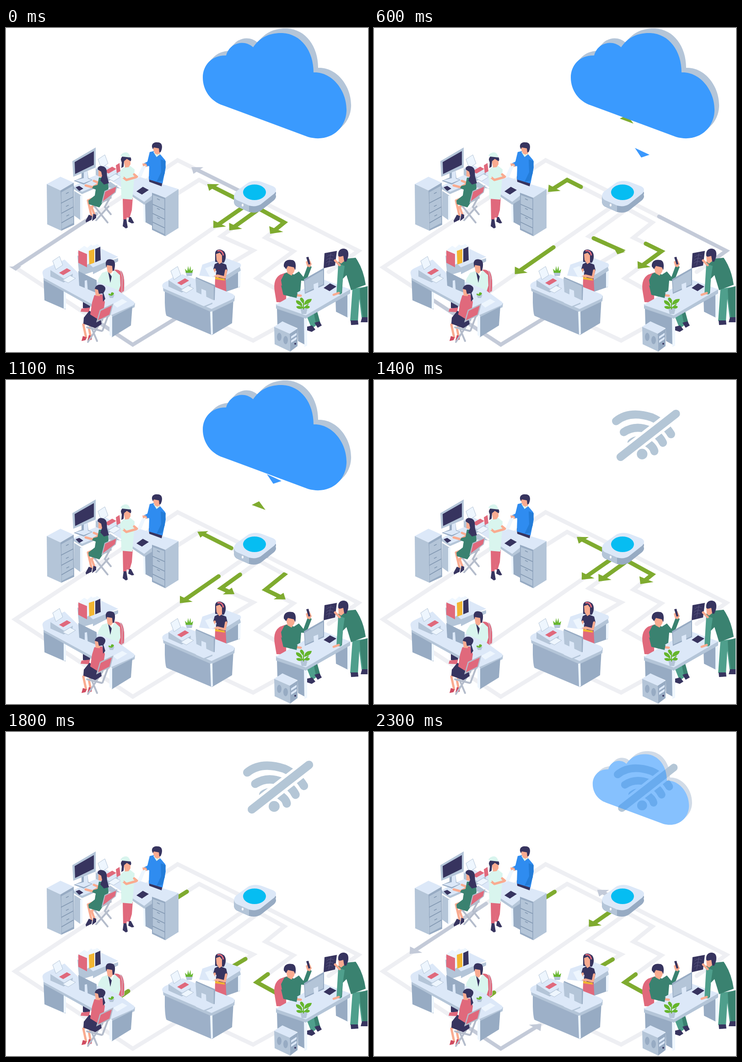
An HTML page that plays this animation: 791 px wide and 708 px high, repeating every 2400 ms.

```html
<!DOCTYPE html>
<html lang="en">
<head>
<meta charset="utf-8">
<title>Office network</title>
<style>
html, body { margin: 0; width: 100%; height: 100%; overflow: hidden; background: #fff; }
svg { display: block; width: 791px; height: 708px; }
.t { fill: #dce8f8 } .l { fill: #b4c5d8 } .d { fill: #97abc3 } .e { fill: #eef6fe }
.n { fill: #37345f } .p { fill: #e0697c } .g { fill: #3a8270 } .h { fill: #4f9f8c }
.s { fill: #f9ab90 } .m { fill: #d9f5ee } .w { fill: #fff } .b { fill: #2f8cf0 }
.y { fill: #f2b632 } .f { fill: #65b52c } .r { fill: #d04a60 }
.line { fill: none; stroke-linejoin: miter; stroke-linecap: round }
.leg { fill: none; stroke: #b4bccb; stroke-width: 4; stroke-linecap: round }
.gap { fill: none; stroke: #8197b1; stroke-width: 1.5 }
.arm { fill: none; stroke: #f9ab90; stroke-width: 5; stroke-linecap: round; stroke-linejoin: round }
</style>
</head>
<body>
<svg viewBox="0 0 791 708">
<defs>
  <path id="puff" d="M474 169C447 160 430 136 430 108C430 81 450 59 481 60C487 34 519 23 540 42C556 18 580 10 604 11C645 13 672 50 672 97C712 95 746 137 744 182C742 222 706 251 660 238Z"/>
  <path id="slab" d="M503 357L529 338Q542 331 558 336L584 346Q595 352 586 362L557 385Q546 392 531 388L504 376Q493 368 503 357Z"/>
  <g id="printer">
    <path class="l" d="M97 529L112 520L146 537L145 546L126 556L97 543Z"/>
    <path class="t" d="M97 529L113 519L146 537L127 548Z"/>
    <path class="e" d="M102 509L117 499L124 518L109 528Z" stroke="#b4c5d8"/>
    <path class="p" d="M116 535L133 525L142 530L125 540Z"/>
    <path class="e" d="M124 551L140 541L152 547L136 557Z" stroke="#b4c5d8"/>
  </g>
</defs>

<g class="line" stroke="#eeeff3" stroke-width="9">
  <path d="M545 373L375 289L20 523L277 692L390 623"/>
  <path d="M545 394L422 332L360 371M545 373L250 578"/>
  <path d="M548 399L470 455L540 486L484 519"/>
  <path d="M555 396L608 425L567 458L628 488L548 547L590 570"/>
  <path d="M570 385L770 487L705 533M470 650L540 683L600 650"/>
</g>
<g id="flow"></g>

<path id="up" fill="#7fab2f" d="M537 273L553 265L567 284Z"/>
<path id="down" fill="#3a98fd" d="M570 262L602 277L584 283Z"/>

<g id="wifi" class="line" stroke="#b4c6d6" stroke-width="20">
  <path d="M522 84Q555 57 610 75Q640 88 657 116M541 111Q570 92 605 107Q628 118 637 137M560 137Q575 125 598 137Q614 147 616 158"/>
  <path d="M533 172L669 66" stroke="#fff" stroke-width="33"/>
  <path d="M533 172L669 66"/>
  <circle cx="586" cy="165" r="13" fill="#b4c6d6" stroke="none"/>
</g>
<g id="cloud">
  <g fill="#b4c5d8"><use href="#puff" x="10" y="-10"/><use href="#puff" x="5" y="-5"/></g>
  <use href="#puff" fill="#3a9afe"/>
</g>

<!-- hub -->
<g class="d"><use href="#slab" y="14"/><use href="#slab" y="7"/></g>
<path class="l" d="M498 367L498 381Q499 386 505 390L531 402L531 388L504 376Z"/>
<use href="#slab" class="t"/>
<ellipse cx="543" cy="359" rx="25" ry="17" fill="#06bdf2"/>
<ellipse class="w" cx="517" cy="387" rx="2" ry="3"/>

<!-- reception -->
<g>
  <path class="l" d="M149 356L165 366L163 420L149 410Z"/>
  <path class="e" d="M162 367L167 365L167 416L162 420Z"/>
  <path class="d" d="M301 382L319 374L319 432L304 424Z"/>
  <path class="e" d="M300 386L304 384L305 424L301 423Z"/>
  <path class="l" d="M148 352L166 363L228 336L302 386L340 362L340 355L148 345Z"/>
  <path class="t" d="M147 346L186 326L228 308L266 317L348 343L302 380L228 332L166 358Z"/>
  <path class="d" d="M165 317L178 311L180 328L189 332L170 342L148 334L165 327Z"/>
  <path class="t" d="M170 315L178 311L179 329L187 332L170 339L151 333L170 328Z"/>
  <path class="l" d="M145 291L196 261L196 305L147 325Z"/>
  <path class="n" d="M150 293L192 269L192 299L151 319Z"/>
  <use href="#printer" x="99" y="-222"/>
  <path class="p" d="M240 300L248 295L250 313L242 317Z"/>
  <path class="n" d="M152 348L160 345L169 351L160 356Z"/>
  <path class="n" d="M285 357L299 347L312 354L297 364Z"/>
  <!-- standing colleague -->
  <path class="n" d="M312 324L343 332L340 346L313 336Z"/>
  <path class="s" d="M321 259L338 262L336 276L332 282L324 278Z"/>
  <path class="b" d="M314 271L323 269L330 281L337 276L348 289L349 305L342 340L312 331L313 303L308 296Z"/>
  <path d="M338 287L349 291L347 317L341 334L329 336L339 315Z" fill="#237cd8"/>
  <path class="m" d="M322 271L329 282L336 276L326 269Z"/>
  <path class="s" d="M322 262H336V273L331 277L325 274Z"/>
  <path class="n" d="M319 260C318 251 326 249 332 250C342 250 343 261 338 271L335 272L334 263L323 261L321 265Z"/>
  <path class="b" d="M315 279L320 286L311 302L302 304L299 297L309 292Z"/>
  <path class="s" d="M298 296L306 296L309 302L300 306Z"/>
  <path class="e" d="M297 303L306 300L296 325L285 329Z"/>
  <!-- nurse -->
  <path class="p" d="M255 371L277 371L275 398L270 415L264 414L268 387L263 420L256 419Z"/>
  <path class="n" d="M257 418L263 418L266 436L262 438L255 433ZM269 413L273 413L280 426L275 427L267 423Z"/>
  <path class="m" d="M256 305L271 301L281 309L280 330L276 375L252 373L251 325L249 314Z"/>
  <path class="s" d="M257 286L272 286L272 298L268 304L260 305Z"/>
  <path class="n" d="M251 288C251 280 259 277 266 279C274 280 275 289 272 291L264 286L258 291L257 303L252 306L253 294Z"/>
  <path class="m" d="M250 279C255 270 267 269 270 278L272 283L254 281Z"/>
  <path class="arm" d="M253 324L263 332L284 326M280 320L286 325"/>
  <path class="m" d="M250 310L258 309L257 328L250 328Z"/>
  <!-- visitor on chair -->
  <path class="arm" stroke-width="7" d="M196 370L179 377L187 411M203 383L187 391L194 410"/>
  <path class="n" d="M181 408L188 411L187 419L175 425L174 421ZM191 406L197 408L197 415L188 422Z"/>
  <path class="leg" d="M193 389L222 425M224 390L197 420M229 371L193 389M239 349L216 391L229 407"/>
  <path class="arm" d="M200 342L189 348L174 344M204 339L192 334"/>
  <path class="g" d="M203 327L222 327L224 350L217 373L204 392L181 385L180 377L194 366L196 353L188 350L191 345L200 343Z"/>
  <path class="s" d="M202 309L211 309L211 326L202 324Z"/>
  <path class="n" d="M200 309C200 301 208 300 214 303C222 307 220 316 221 325L225 339L214 342L206 333L210 323L208 314Z"/>
  <path class="p" d="M216 357L242 345L239 359L210 381Z" stroke="#b4bccb" stroke-width="2"/>
  <!-- filing cabinets -->
  <path class="t" d="M89 341L119 325L148 338L119 355Z"/>
  <path class="l" d="M89 341L119 355L121 443L90 429Z"/>
  <path class="d" d="M119 355L148 338L149 430L121 443Z"/>
  <path class="l" d="M121 359L146 345L147 426L122 439Z"/>
  <path class="gap" d="M120 383L147 369M121 405L147 391M121 426L147 411M131 362L137 359M131 390L137 387M132 411L138 408"/>
  <path class="t" d="M319 360L348 343L377 352L348 371Z"/>
  <path class="d" d="M319 360L348 371L348 455L319 441Z"/>
  <path class="l" d="M348 371L377 352L377 437L348 455ZM321 365L346 374L346 450L321 438Z"/>
  <path class="gap" d="M320 385L347 397M320 405L347 418M320 424L347 437M330 373L336 376M330 394L336 397M330 414L336 417"/>
</g>

<!-- consulting desk -->
<g>
  <path class="d" d="M82 546L130 572L130 615L84 595Z"/>
  <path class="e" d="M126 570L131 570L131 613L126 614Z"/>
  <path class="l" d="M156 497L192 519L192 532L160 542ZM190 520L245 503L245 510L190 538Z"/>
  <path class="t" d="M155 491L193 475L245 500L190 523Z"/>
  <!-- binders -->
  <path class="e" d="M160 484L171 476L184 484L184 513L176 518L158 488ZM178 480L186 473L196 480L196 508L188 512ZM191 477L199 472L208 478L208 505L199 508Z"/>
  <path class="p" d="M158 486L177 494L177 523L158 513Z"/>
  <path class="y" d="M181 487L193 483L193 513L182 517Z"/>
  <path class="n" d="M195 483L206 478L207 507L195 512Z"/>
  <!-- doctor -->
  <path class="p" d="M235 529Q250 524 257 543L258 575L242 587L244 546Z"/>
  <path class="p" d="M250 529Q261 537 258 575L253 578L254 545Z" stroke="#d7dce7"/>
  <path class="m" d="M210 535L222 531L232 540L237 529L249 540L250 563L241 591L199 566L202 548Z"/>
  <path class="n" d="M223 532L231 543L228 557Z"/>
  <path class="s" d="M219 516L235 518L234 530L229 537L222 533Z"/>
  <path class="n" d="M218 516C217 506 225 504 231 506C240 507 239 520 236 530L233 531L232 520L221 518L219 523Z"/>
  <path class="n" d="M168 592L185 598L183 614L168 612Z"/>
  <path class="p" d="M165 613L183 611L182 621L163 620Z"/>
  <path class="l" d="M82 538L231 622L282 601L281 610L231 634L82 551Z"/>
  <path class="t" d="M80 537Q78 530 88 525L128 506L163 540L243 572L276 596Q285 601 278 606L231 627L82 546Z"/>
  <path class="d" d="M231 632L276 609L273 650L231 676Z"/>
  <path class="e" d="M226 620L232 630L232 675L226 671Z"/>
  <use href="#printer"/>
  <path class="d" d="M158 531L198 551L198 579L160 563Z"/>
  <path class="t" d="M172 552L177 551L179 578L191 580L175 588L157 581L172 576Z"/>
  <path class="e" d="M234 603L254 592L265 598L243 611Z"/>
  <path class="l" d="M224 583L237 583L234 590L227 590Z"/>
  <path class="f" d="M230 585Q221 583 225 580L229 582Q229 576 234 578Q239 581 231 585Z"/>
  <!-- patient -->
  <path class="arm" stroke-width="6" d="M181 639L169 648L175 676M191 648L181 655L185 675"/>
  <path class="r" d="M168 673L176 676L174 682L165 684ZM181 671L188 673L187 681L178 683Z"/>
  <path class="leg" d="M177 654L209 662M211 637L179 686M186 653L199 684M231 607L211 661"/>
  <path class="n" d="M182 618L205 629L209 647L195 656L169 646L170 633Z"/>
  <path class="p" d="M193 584L210 582L216 599L212 626L200 636L184 626L188 600Z"/>
  <path class="s" d="M194 570L207 572L205 586L196 585Z"/>
  <path class="n" d="M194 570C196 560 207 559 213 563C220 567 217 574 213 579L217 592L212 598L211 580L203 581L201 572Z"/>
  <path class="p" d="M206 617L233 604L227 627L199 641Z" stroke="#b4bccb" stroke-width="2.5"/>
</g>

<!-- front desk -->
<g>
  <path class="d" d="M479 543L512 525L511 566L479 577Z"/>
  <path class="e" d="M507 529L513 525L512 565L507 567Z"/>
  <path class="t" d="M429 517L476 501L511 514Q516 518 511 524L476 547L422 541Z"/>
  <path class="l" d="M511 522L477 543L477 553L513 530Z"/>
  <!-- clerk -->
  <path class="p" d="M457 546L480 546L482 586L456 580Z"/>
  <path class="n" d="M456 516L466 511L481 517L484 529L479 549L457 548L460 531L453 527Z"/>
  <path class="n" d="M457 493C457 484 466 482 473 486C483 490 481 506 476 513L457 511Z"/>
  <path class="s" d="M459 494L467 491L472 497L472 512L466 516L460 507Z"/>
  <path fill="none" stroke="#e0697c" stroke-width="3" d="M462 487Q472 484 475 497"/>
  <path class="arm" d="M456 528L452 539L463 543M481 530L478 545L462 541"/>
  <path class="y" d="M457 544L478 548L478 552L457 549Z"/>
  <path class="e" d="M435 525L449 520L459 540L446 545Z"/>
  <path d="M347 573L449 615L450 671L351 629Q348 626 347 600Z" fill="#9db0c8"/>
  <path class="d" d="M449 615L497 592L494 645L450 671Z"/>
  <path class="l" d="M342 560L449 607L500 585L499 597L449 621L344 575Z"/>
  <path class="e" d="M446 620L451 619L452 669L448 671Z"/>
  <path class="t" d="M342 566Q339 560 348 555L386 538L495 581Q503 586 496 592L449 614L344 569Z"/>
  <use href="#printer" x="258" y="22"/>
  <path class="l" d="M392 533L408 533L406 542L395 542Z"/>
  <path class="f" d="M393 535L391 526L396 531L398 520L400 530L403 520L404 531L409 527L407 535Z"/>
  <path class="d" d="M415 544L457 562L456 595L417 575Z"/>
  <path class="l" d="M414 546L454 564L454 595L416 577Z"/>
  <path class="t" d="M427 570L437 574L438 596L450 600L432 608L414 600L427 594Z"/>
  <path class="l" d="M414 600L432 608L451 600L451 603L432 611L414 603Z"/>
</g>

<!-- surgeons -->
<g>
  <path class="p" d="M587 575Q583 549 599 539L613 534L612 600L591 599Z"/>
  <path class="g" d="M608 537L617 533L629 539L640 532L650 544L660 517L668 522L656 553L645 552L643 575L646 588L635 592L606 581L601 551Z"/>
  <path class="s" d="M611 519L632 520L630 532L624 541L615 536Z"/>
  <path class="n" d="M607 521C606 508 617 505 625 507C634 508 634 520 632 529L629 523L616 520L612 527Z"/>
  <path class="s" d="M655 511L663 505L668 516L664 523L658 521Z"/>
  <path class="n" d="M656 501L661 500L665 516L661 517ZM696 492L723 487L719 519L694 525Z"/>
  <path fill="none" stroke="#5a5780" d="M710 492L705 519M701 500Q709 493 716 498M699 508Q707 500 715 505M699 514Q707 507 714 512"/>
  <path class="h" d="M658 632L672 620L680 648L668 657Z"/>
  <path class="g" d="M672 620L679 616L687 645L678 650Z"/>
  <path class="n" d="M656 653L669 650L676 659L668 664L656 660ZM674 644L685 641L690 650L681 655Z"/>
  <path class="d" d="M592 611L652 632L653 692L638 684L637 656L607 643L593 648Z"/>
  <path class="e" d="M651 630L658 627L658 694L652 697Z"/>
  <path class="d" d="M720 592L748 577L747 633L721 620Z"/>
  <path class="e" d="M746 578L752 574L752 630L746 633Z"/>
  <path class="l" d="M590 603L655 626L752 571L752 580L655 635L590 613Z"/>
  <path class="t" d="M589 605L689 548L752 571L655 628Z"/>
  <path class="arm" d="M611 581L644 585"/>
  <path class="g" d="M601 562L614 572L637 579L635 590L606 583Z"/>
  <path class="d" d="M651 549L695 524L695 562L653 581Z"/>
  <path class="l" d="M653 552L693 529L693 560L654 578Z"/>
  <path class="t" d="M672 560L682 556L683 583L695 586L678 598L663 592L674 586Z"/>
  <path class="n" d="M694 568L708 558L722 565L707 575Z"/>
  <path class="l" d="M643 612L659 612L656 625L646 625Z"/>
  <path fill="none" stroke="#65b52c" stroke-width="2" d="M650 615V594M650 612L640 602M651 612L661 603"/>
  <path class="f" d="M650 603Q637 590 646 589Q654 593 650 603ZM648 607Q632 604 634 595Q645 595 648 607ZM651 605Q653 591 668 592Q667 602 651 605ZM649 612Q638 617 634 609Q642 605 649 612ZM651 611Q658 603 664 609Q662 616 651 611Z"/>
  <!-- standing surgeon -->
  <path class="h" d="M757 570L789 565L789 632L777 633L772 592L769 641L752 640Z"/>
  <path class="g" d="M773 570L790 564L790 632L780 634L774 590Z"/>
  <path class="n" d="M753 639L769 639L770 648L754 649ZM778 632L790 632L790 643L775 643Z"/>
  <path class="g" d="M726 511L745 504L764 502Q781 526 786 561L754 573L744 540L736 548L734 580L724 582L726 547Z"/>
  <path class="s" d="M726 497L741 498L741 508L732 515L727 511Z"/>
  <path class="h" d="M726 515L740 520L736 548L732 582L722 582Z"/>
  <path class="n" d="M726 498C724 484 735 480 742 483C752 487 748 503 743 511L739 510L737 498L729 500Z"/>
  <path class="arm" d="M719 508L729 518M727 579L716 583"/>
  <!-- computer tower -->
  <path class="t" d="M586 653L604 641L637 657L620 668Z"/>
  <path class="l" d="M586 653L620 668L621 707L587 691Z"/>
  <path class="d" d="M620 668L637 657L637 695L621 707Z"/>
  <path class="t" d="M623 674L635 666V671L623 679ZM623 683L635 675V680L623 688Z"/>
  <ellipse class="d" cx="597" cy="675" rx="5" ry="9"/><ellipse class="d" cx="611" cy="682" rx="5" ry="9"/>
  <circle class="n" cx="632" cy="690" r="2"/>
</g>
</svg>

<script>
const LOOP = 2400, STEP = 100;
const $ = id => document.getElementById(id);
const flow = $('flow');

// Value on a polyline of [x, y] keys, or null outside it.
function at(keys, x) {
  for (let i = 1; i < keys.length; i++) {
    const [x0, y0] = keys[i - 1], [x1, y1] = keys[i];
    if (x >= x0 && x <= x1) return y0 + (y1 - y0) * (x - x0) / (x1 - x0);
  }
  return null;
}

function add(name, attrs) {
  const node = document.createElementNS('http://www.w3.org/2000/svg', name);
  for (const key in attrs) node.setAttribute(key, attrs[key]);
  return flow.appendChild(node);
}

// Returns a function that places the arrow by the distance of its tail.
function arrow(d, color, size, width, headLimit = Infinity) {
  const shaft = add('path', { d, class: 'line', stroke: color, 'stroke-width': width, 'stroke-dasharray': `${size - 13} 9999` });
  const head = add('polygon', { fill: color });
  const total = shaft.getTotalLength();
  return tail => {
    const mid = tail + size - 13;
    shaft.style.display = tail === null ? 'none' : '';
    const shown = tail !== null && mid > 0 && mid < total && tail + size < headLimit;
    head.style.display = shown ? '' : 'none';
    if (tail === null) return;
    shaft.setAttribute('stroke-dashoffset', -tail);
    if (!shown) return;
    const a = shaft.getPointAtLength(mid - 11), b = shaft.getPointAtLength(mid + 11);
    const p = shaft.getPointAtLength(mid);
    // Forward vector, blended around corners; the wings are square to it on the isometric floor.
    const u = (b.x - a.x) / 22, v = (b.y - a.y) / 22;
    const points = [[13, 0], [-4, 14], [-4, -14]].map(([f, w]) => [p.x + f * u + w * v * 1.74, p.y + f * v - w * u / 1.74]);
    head.setAttribute('points', points.join(' '));
  };
}

// Turns of the green arrows over time, and tail distances over one turn.
const turns = [[0, .057], [300, .81], [600, 1.56], [1100, 2.31], [1600, 3.55], [2000, 4.42], [2300, 5], [2400, 5.057]];
const marks = [0, .057, .31, .42, .56, .81, 1];
const green = [
  ['M545 394L422 332L360 371', 83, [-40, 35, 59, 72, 104, 161, 170]],
  ['M545 373L250 578', 103, [-11, 9, 98, 137, 186, 274, 344]],
  ['M548 399L470 455L540 486L484 519', 83, [-75, -9, 45, 60, 107, 170, 194]],
  ['M555 396L608 425L567 458L628 488L548 547L590 570', 102, [-120, -2, 60, 80, 143, 243, 251]]
].map(([d, size, tails]) => ({
  keys: marks.map((m, i) => [m, tails[i]]),
  put: [0, 1].map(() => arrow(d, '#7fab2f', size, 9))
}));

// Tip distances of the grey arrows; times past the loop run on into the next one.
const GREY = 226;
const grey = [
  ['M545 373L375 289L330 318', [[2200, -20], [2300, 64], [2400, 156], [2700, 460]]],
  ['M245 375L20 523L277 692', [[1900, 100], [2000, 174], [2300, 200], [2400, 283], [2700, 333], [3000, 590]]],
  ['M190 635L277 692L390 623', [[2000, 0], [2300, 208], [2400, 235], [2700, 306], [3000, 324], [3500, 480]]],
  ['M705 533L770 487L570 385', [[0, 0], [300, 213], [600, 258], [1100, 530]], 235]
].map(([d, keys, limit]) => ({ keys, put: arrow(d, '#c3cad8', GREY, 8, limit) }));

const rise = t => at([[0, 75], [600, -75]], t) ?? at([[800, 75], [1300, -50]], t);
const fall = t => at([[300, -75], [900, 75]], t) ?? at([[1025, -75], [1300, -6]], t);

function slide(node, y) {
  node.style.display = y === null ? 'none' : '';
  node.setAttribute('transform', `translate(0 ${y ?? 0})`);
}

function zoom(node, x, y, scale, opacity) {
  node.setAttribute('transform', `translate(${x} ${y}) scale(${scale}) translate(${-x} ${-y})`);
  node.setAttribute('opacity', opacity);
}

function draw(t) {
  const turn = at(turns, t) % 1;
  for (const { keys, put } of green) {
    put[0](at(keys, turn));
    put[1](turn < .02 ? at(keys, 1) : null);
  }
  for (const { keys, put } of grey) {
    const tip = at(keys, t) ?? at(keys, t + LOOP);
    put(tip === null ? null : tip - GREY);
  }
  slide($('up'), rise(t));
  slide($('down'), fall(t));
  const fading = t === 1300 || t === 2300;
  zoom($('cloud'), 575, 125, fading ? .67 : 1, fading ? .61 : t < 1300 ? 1 : 0);
  const size = at([[1300, .835], [1600, 1], [2000, .835], [2300, .835]], t);
  zoom($('wifi'), 585, 137, size ?? 1, size ? 1 : 0);
}

const start = performance.now();
function tick() {
  const t = (performance.now() - start) % LOOP;
  draw(Math.floor(t / STEP) * STEP);
  requestAnimationFrame(tick);
}
tick();
</script>
</body>
</html>
```
